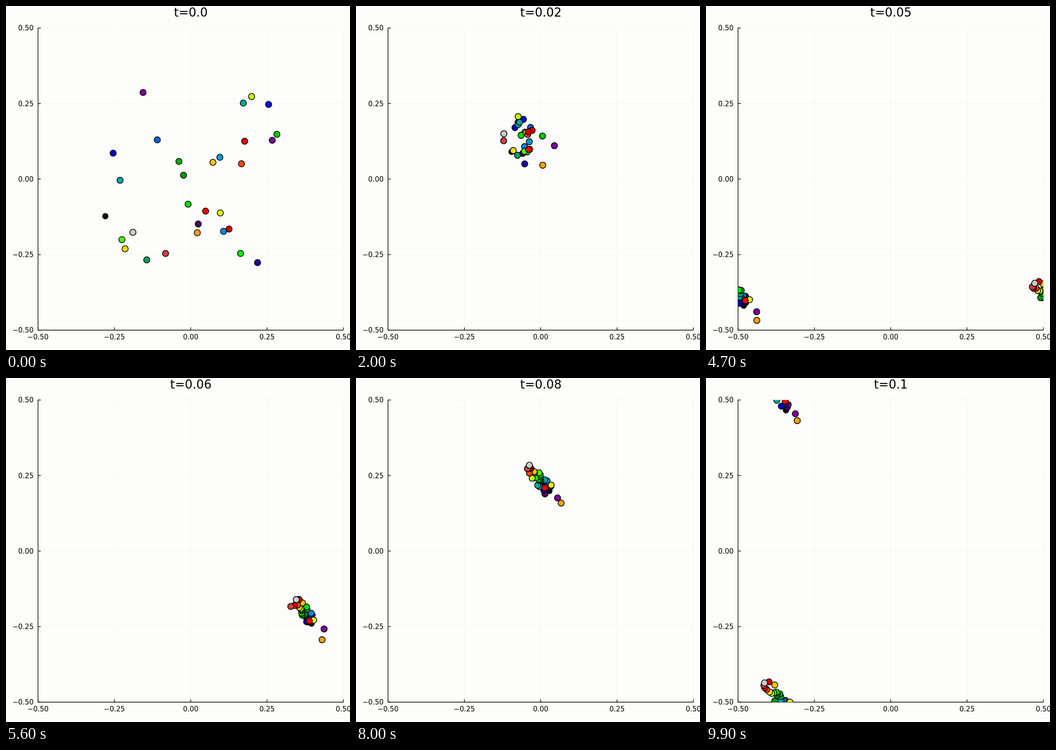
These frames come from a looping animation (748x748 px, 10000 ms). An HTML page with a canvas:

```html
<!DOCTYPE html>
<html>
<head>
<meta charset="utf-8">
<style>
html, body { margin: 0; width: 100%; height: 100%; overflow: hidden; background: #fdfdfc; }
canvas { display: block; }
</style>
</head>
<body>
<canvas id="stage" width="748" height="748"></canvas>
<script>
const ctx = document.getElementById('stage').getContext('2d');
const LEFT = 69.6, TOP = 47.8, W = 664, H = 657;
const RIGHT = LEFT + W, BOTTOM = TOP + H, STEPS = 100;

// Colour ramp, sampled evenly by the dots
const ramp = '000 708 809 00a 00d 07d 09d 0aa 0a8 090 0b0 0d0 0f0 bf0 ee0 fc0 f90 f00 d00 c00 ccc'.split(' ');

// Scattered starting places; all later motion follows from rules
const start = [
  [216, 457], [418, 474], [298, 188], [579, 292], [547, 558], [233, 320],
  [571, 214], [329, 291], [473, 490], [465, 329], [248, 379], [516, 211],
  [306, 552], [386, 368], [376, 338], [589, 279], [396, 431], [510, 538],
  [252, 508], [534, 197], [466, 450], [259, 528], [450, 340], [416, 493],
  [512, 343], [434, 446], [519, 294], [485, 485], [347, 538], [276, 492]];

// Dots that trail the flock, with their distance behind its centre
const stragglers = { 3: 40, 20: 18, 23: 50, 25: 14 };

// Flock centre without wrapping: step, x, y
const path = [[0, 413, 394], [20, 364, 287], [35, 211, 100], [47, 72, -30],
  [64, -90, -249], [80, -263, -435], [99, -506, -619]];

const mix = (a, b, u) => a + (b - a) * u;
const mod = (a, n) => ((a % n) + n) % n;
const ease = u => { u = Math.min(1, Math.max(0, u)); return u * u * (3 - 2 * u); };
const noise = n => 2 * mod(Math.sin(n * 12.9898 + 4) * 43758.5453, 1) - 1;

function dotColor(i) {
  const p = i / (start.length - 1) * 20, k = Math.min(19, Math.floor(p));
  const c = [0, 1, 2].map(j =>
    Math.round(17 * mix(parseInt(ramp[k][j], 16), parseInt(ramp[k + 1][j], 16), p - k)));
  return `rgb(${c})`;
}
const colors = start.map((_, i) => dotColor(i));

function slope(k, axis) {
  const a = path[Math.max(0, k - 1)], b = path[Math.min(path.length - 1, k + 1)];
  return (b[axis] - a[axis]) / (b[0] - a[0]);
}

function center(step, axis) {
  let k = 0;
  while (k < path.length - 2 && step >= path[k + 1][0]) k++;
  const a = path[k], b = path[k + 1], d = b[0] - a[0], u = (step - a[0]) / d;
  return mix(a[axis], b[axis], ease(u)) +
    d * u * (1 - u) * ((1 - u) * slope(k, axis) - u * slope(k + 1, axis));
}

// Each dot swirls in from its start and joins a slowly stretching diagonal flock
function place(i, step) {
  const join = ease(step / 28), turn = 1.3 * noise(i) * join;
  const x = start[i][0] - path[0][1], y = start[i][1] - path[0][2];
  const swirl = [x * Math.cos(turn) - y * Math.sin(turn), x * Math.sin(turn) + y * Math.cos(turn)];
  const lag = stragglers[i] || (17 - 1.35 * i) * (0.7 + 0.8 * step / STEPS);
  const side = 6 * noise(i + 50) + 4 * Math.sin(step / 9 + i * 2.4);
  const flock = [0.9 * lag + side, lag - side];
  return [0, 1].map(j => center(step, j + 1) + mix(swirl[j], flock[j], join));
}

function line(x1, y1, x2, y2) {
  ctx.beginPath();
  ctx.moveTo(x1, y1);
  ctx.lineTo(x2, y2);
  ctx.stroke();
}

function label(text, x, y, size, align) {
  ctx.font = `${size}px "DejaVu Sans", sans-serif`;
  ctx.textAlign = align;
  ctx.fillStyle = '#000';
  ctx.fillText(text, x, y);
}

function drawAxes() {
  ctx.fillStyle = '#fdfdfc';
  ctx.fillRect(0, 0, 748, 748);
  for (let k = 0; k < 5; k++) {
    const x = LEFT + W * k / 4, y = BOTTOM - H * k / 4, v = k / 4 - 0.5;
    const text = (v < 0 ? '\u2212' : '') + Math.abs(v).toFixed(2);
    ctx.lineWidth = 1;
    ctx.strokeStyle = '#e6e6ea';
    ctx.setLineDash([1.5, 1.5]);
    line(x, TOP, x, BOTTOM);
    line(LEFT, y, RIGHT, y);
    ctx.setLineDash([]);
    ctx.strokeStyle = '#000';
    ctx.lineWidth = 1.4;
    line(x, BOTTOM, x, BOTTOM - 6);
    line(LEFT, y, LEFT + 6, y);
    label(text, x, 724.5, 15, 'center');
    label(text, 60, y + 5.6, 15, 'right');
  }
  line(LEFT, TOP - 0.5, LEFT, BOTTOM + 0.5);
  line(LEFT, BOTTOM, RIGHT, BOTTOM);
}

// Two decimals, halves to even, no trailing zero
function timeText(step) {
  const n = step % 10 === 5 ? 2 * Math.round(step / 20) : Math.round(step / 10);
  return 't=' + (n / 100).toFixed(n % 10 ? 2 : 1);
}

function drawDots(step) {
  ctx.save();
  ctx.beginPath();
  ctx.rect(LEFT, TOP, W, H);
  ctx.clip();
  ctx.strokeStyle = '#000';
  ctx.lineWidth = 1.6;
  colors.forEach((color, i) => {
    const [x, y] = place(i, step);
    ctx.beginPath();
    ctx.arc(LEFT + mod(x - LEFT, W), TOP + mod(y - TOP, H), 6.7, 0, 2 * Math.PI);
    ctx.fillStyle = color;
    ctx.fill();
    if (i) ctx.stroke();
  });
  ctx.restore();
}

const begin = performance.now();
function frame() {
  const step = Math.floor((performance.now() - begin) / 100) % STEPS;
  drawAxes();
  label(timeText(step), 402, 23, 26, 'center');
  drawDots(step);
  requestAnimationFrame(frame);
}
frame();
</script>
</body>
</html>
```
